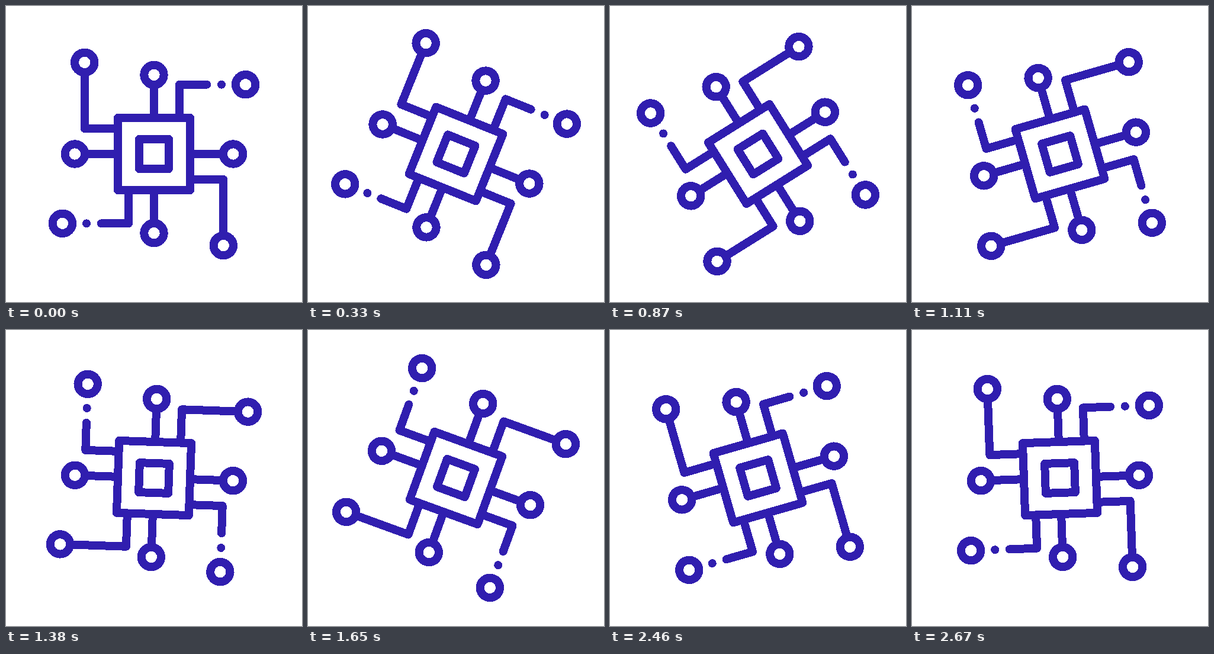
An HTML page that plays this animation: 500x500 px, repeating every 2.7 s.

```html
<!DOCTYPE html>
<html lang="en">
<head>
<meta charset="utf-8">
<title>Rotating circuit chip</title>
<style>
  html, body { margin: 0; width: 100%; height: 100%; overflow: hidden; background: #fff; }
  svg { display: block; width: 100vw; height: 100vh; }
  #chip {
    fill: none;
    stroke: #301eaf;
    stroke-width: 14;
    stroke-linecap: round;
    stroke-linejoin: round;
    shape-rendering: crispEdges;
  }
  .dot { fill: #301eaf; stroke: none; }
</style>
</head>
<body>
<svg viewBox="-250 -250 500 500">
  <defs>
    <!-- one half of the wiring; the other half is its point reflection -->
    <g id="half">
      <path d="M0-61V-117M61 0H117M-61-43H-117.3V-138M43-61V-117.3H89.3"/>
      <circle cy="-133.6" r="16.7"/>
      <circle cx="133.6" r="16.7"/>
      <circle cx="-117.3" cy="-154.6" r="16.7"/>
      <circle cx="154.6" cy="-117.3" r="16.7"/>
      <circle class="dot" cx="114" cy="-117.3" r="7"/>
    </g>
  </defs>
  <g id="chip">
    <rect x="-61" y="-61" width="122" height="122"/>
    <rect x="-25" y="-25" width="50" height="50"/>
    <use href="#half"/>
    <use href="#half" transform="rotate(180)"/>
  </g>
</svg>
<script>
  const LOOP = 2700, STEP = 30, TURN = 180;
  const chip = document.getElementById('chip');
  const start = performance.now();

  // Half a turn closes the loop because the chip has two-fold symmetry.
  function draw() {
    const time = (performance.now() - start) % LOOP;
    const step = Math.floor(time / STEP + 0.01);
    chip.setAttribute('transform', `rotate(${step * STEP / LOOP * TURN})`);
    requestAnimationFrame(draw);
  }
  draw();
</script>
</body>
</html>
```
